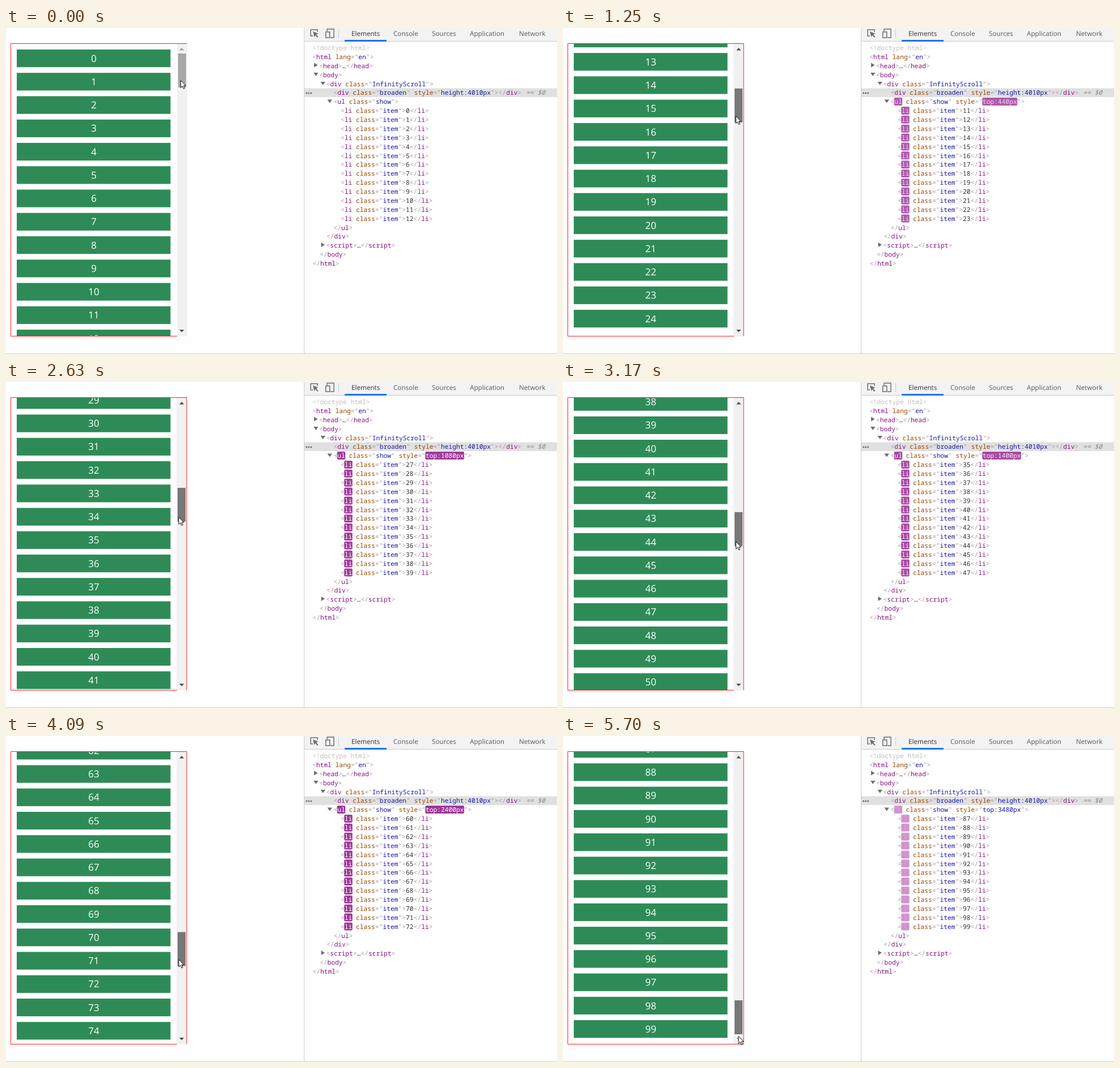
An HTML page that plays this animation: 973x576 px, repeating every 5780 ms.

```html
<!DOCTYPE html>
<html lang="en">
<head>
<meta charset="utf-8">
<title>Infinite scroll</title>
<style>
  html, body { margin: 0; width: 100%; height: 100%; overflow: hidden; background: #fff; }
  svg { display: block; width: 973px; height: 576px; }
  text { text-rendering: geometricPrecision; white-space: pre; }
  .item { font: 17px "Open Sans", "Noto Sans", sans-serif; fill: #fff; text-anchor: middle; }
  .tab { font: 11.7px "Open Sans", "Noto Sans", sans-serif; fill: #5a5a5a; }
  .code { font: 11.28px "Noto Sans Mono", "DejaVu Sans Mono", monospace; }
  .punct { fill: #a894a6; }
  .tag { fill: #881280; }
  .attr { fill: #994500; }
  .value { fill: #1a1aa6; }
  .plain { fill: #303030; }
</style>
</head>
<body>
<svg viewBox="0 0 973 576">
  <clipPath id="view"><rect x="9" y="28" width="293" height="516"/></clipPath>
  <rect width="973" height="576" fill="#fff"/>
  <g id="list" clip-path="url(#view)"></g>
  <g id="bar"></g>
  <path d="M302 27.5H8.500V544.500H302M302 27.500H319.500" fill="none" stroke="#f22" stroke-width="1"/>
  <path id="edge" fill="none" stroke="#f22"/>
  <path id="cursor" d="M.5 .5V13.500L3.500 10.700 5.600 15.500 7.700 14.600 5.700 9.900H9.500Z" fill="#fff" stroke="#111" stroke-width="1"/>

  <rect x="527" width="446" height="23" fill="#f3f3f3"/>
  <path d="M527 23.500H973M526.500 0V576M0 575.500H973M587.500 2V18" stroke="#ccc"/>
  <rect x="598" y="21" width="74" height="3" fill="#1a73e8"/>
  <g fill="none" stroke="#6e6e6e" stroke-width="1.5">
    <path d="M542 14H538V3H550V7"/>
    <path d="M567 6V2H579V17H573"/>
    <rect x="564.700" y="7" width="7" height="10"/>
  </g>
  <path d="M542 6L551.500 10 547.800 11.400 551.500 15.500 550 17 546.200 12.900 544.500 16Z" fill="#6e6e6e"/>
  <g id="tabs"></g>
  <rect x="527" y="106.500" width="446" height="15.500" fill="#e0e0e0"/>
  <g fill="#6e6e6e">
    <circle cx="530.700" cy="115" r="1.500"/><circle cx="534.700" cy="115" r="1.500"/><circle cx="538.700" cy="115" r="1.500"/>
    <path d="M544 61.500V69.500L550.500 65.500ZM556.500 379V387L563 383ZM543 79H551.500L547.200 85ZM555.500 95H564L559.700 101ZM567.500 126.500H576L571.700 132.500Z"/>
  </g>
  <g id="markup"></g>
  <g id="live"></g>
</svg>
<script>
const LOOP = 5780, CHAR = 6.77, ROW = 15.875, PITCH = 41.25, TRAVEL = 422, RANGE = 3510, ZOOM = 1.03125;
const GROUP_TIMES = [170, 780, 1400, 2020, 2630, 3250, 3860, 4470, 5090, 5700];

// step, thumb travel, pointer offset from thumb top, pointer x
const DRAG = [
  [-1, 0, 47, 308], [2, 20, 47, 305], [5, 35, 47, 305], [7, 40.3, 47, 305],
  [21, 83.3, 49.5, 304.5], [29, 122, 51, 304.5], [32, 142, 51, 304.5], [36, 163, 51, 304.5],
  [39, 184.9, 51.5, 305], [51, 301.4, 48, 304.5], [65.5, 422, 50, 306], [70, 422, 63, 309.5]
];
const LAST_UPDATE = 66.99;

const $ = id => document.getElementById(id);
const mix = (a, b, f) => `rgb(${a.map((v, i) => Math.round(v + (b[i] - v) * f))})`;
const rect = (x, y, w, h, fill, r = 0) =>
  `<rect x="${x}" y="${y}" width="${w}" height="${h}" rx="${r}" fill="${fill}"/>`;
const escape = s => s.replace(/</g, "&lt;").replace(/>/g, "&gt;");
const baseline = row => 39 + row * ROW;

function dragAt(k, col) {
  const i = DRAG.findIndex(p => p[0] >= k);
  if (i < 0) return DRAG[DRAG.length - 1][col];
  if (i === 0) return DRAG[0][col];
  const a = DRAG[i - 1], b = DRAG[i];
  return a[col] + (b[col] - a[col]) * (k - a[0]) / (b[0] - a[0]);
}

function stepAt(t) {
  let i = GROUP_TIMES.length - 1;
  while (i >= 0 && t < GROUP_TIMES[i]) i--;
  if (i < 0) return -1;
  if (i === GROUP_TIMES.length - 1) return 72;
  const length = GROUP_TIMES[i + 1] - GROUP_TIMES[i];
  let j = 7;
  while (j && t - GROUP_TIMES[i] < Math.round((j * length / 8 + 2) / 10) * 10) j--;
  return i * 8 + j;
}

// Colours one line of markup; flash = { back, text, value } marks changed parts.
function codeLine(x, row, source, flash) {
  const y = baseline(row);
  let back = "", spans = "", col = 0;
  const put = (s, kind, lit) => {
    if (!s) return;
    const left = x + col * CHAR;
    if (lit) back += rect(left - 0.6, y - 11.2, s.length * CHAR + 1, 14, flash.back, 2);
    if (s.trim()) spans += `<tspan x="${left}" class="${kind}"${lit ? ` style="fill:${flash.text}"` : ""}>${escape(s)}</tspan>`;
    col += s.length;
  };
  for (const m of source.matchAll(/(<\/?)(\w+)|(\w+)(=")([^"]*)(")|(>)|([^<>\s]+)|(\s+)/g)) {
    if (m[1]) {
      put(m[1], "punct");
      put(m[2], "tag", flash && m[1] === "<");
    } else if (m[3]) {
      put(m[3], "attr");
      put(m[4], "punct");
      put(m[5], "value", flash && flash.value && m[3] === "style");
      put(m[6], "punct");
    } else if (m[7]) put(m[7], "punct");
    else put(m[8] || m[9], "plain");
  }
  return `${back}<text class="code" y="${y}">${spans}</text>`;
}

function drawFixed() {
  const tabs = [["Elements", 610], ["Console", 684], ["Sources", 752], ["Application", 819], ["Network", 906]];
  $("tabs").innerHTML = tabs.map(([name, x], i) =>
    `<text class="tab" x="${x}" y="14"${i ? "" : ' style="fill:#333"'}>${name}</text>`).join("");
  const lines = [
    [541, 1, '<html lang="en">'], [553, 2, "<head>…</head>"], [553, 3, "<body>"],
    [565.5, 4, '<div class="InfinityScroll">'],
    [578.5, 5, '<div class="broaden" style="height:4010px"></div>'],
    [578.5, 20, "</ul>"], [566, 21, "</div>"], [565.5, 22, "<script>…<\/script>"],
    [554, 23, "</body>"], [541.5, 24, "</html>"]
  ];
  $("markup").innerHTML =
    `<text class="code" x="541" y="${baseline(0)}" fill="#c0c0c0">&lt;!doctype html&gt;</text>` +
    `<text class="code" x="918.5" y="${baseline(5)}" fill="#888" font-style="italic" style="font-style:italic">== $0</text>` +
    lines.map(line => codeLine(...line)).join("");
}

function drawList(travel) {
  const scroll = travel / TRAVEL * RANGE * ZOOM;
  const first = Math.floor(scroll / PITCH);
  let out = "";
  for (let n = first; n < Math.min(first + 13, 100); n++) {
    const y = 38 + n * PITCH - scroll;
    out += rect(19, y, 271.5, 31.2, "#2e8b57") + `<text class="item" x="155" y="${y + 21.7}">${n}</text>`;
  }
  $("list").innerHTML = out;
}

function drawBar(k, travel) {
  const idle = k < 0, shift = idle ? 1 : 0, dark = "#505050", pale = "#a3a3a3";
  $("bar").innerHTML =
    rect(301 + shift, 28, 18, 517, "#f1f1f1") +
    rect(303 + shift, 45 + travel, 14, 60, idle ? "#a8a8a8" : "#787878") +
    `<path d="M306 39.500H314.500L310.250 35Z" fill="${travel ? dark : pale}"/>` +
    `<path d="M306 533H314.500L310.250 537.500Z" fill="${travel < TRAVEL ? dark : pale}"/>`;
  $("edge").setAttribute("d", idle ? "" : "M319 27.500V544.500" + (k >= 66 ? "H302" : ""));
  $("cursor").setAttribute("transform",
    `translate(${dragAt(k, 3)} ${45 + travel + dragAt(k, 2)})`);
}

// The inspector refreshes less often than the list and trails behind it.
function drawInspector(k) {
  const update = Math.min(LAST_UPDATE, 1.39 + 1.6 * Math.floor((k - 1.39) / 1.6));
  const active = k >= 2;
  const first = active ? Math.floor(dragAt(update - 1, 1) / TRAVEL * RANGE / 40) : 0;
  const age = k - update, fade = Math.min(age * 0.15, 0.6);
  const flash = active && first ? {
    back: mix([158, 54, 153], [245, 219, 244], fade),
    text: mix([255, 255, 255], [136, 18, 128], fade * 0.8),
    value: k > 7 && age < 3
  } : null;
  const style = first ? ` style="top:${first * 40}px"` : "";
  let out = codeLine(578.5, 6, `<ul class="show"${style}>`, flash);
  for (let i = 0; i < 13; i++)
    out += codeLine(591, 7 + i, `<li class="item">${first + i}</li>`, flash);
  $("live").innerHTML = out;
}

let shown = null;
const start = performance.now();
function render() {
  const k = stepAt((performance.now() - start) % LOOP);
  if (k !== shown) {
    shown = k;
    const travel = dragAt(k, 1);
    drawList(travel);
    drawBar(k, travel);
    drawInspector(k);
  }
  requestAnimationFrame(render);
}
drawFixed();
render();
</script>
</body>
</html>
```
